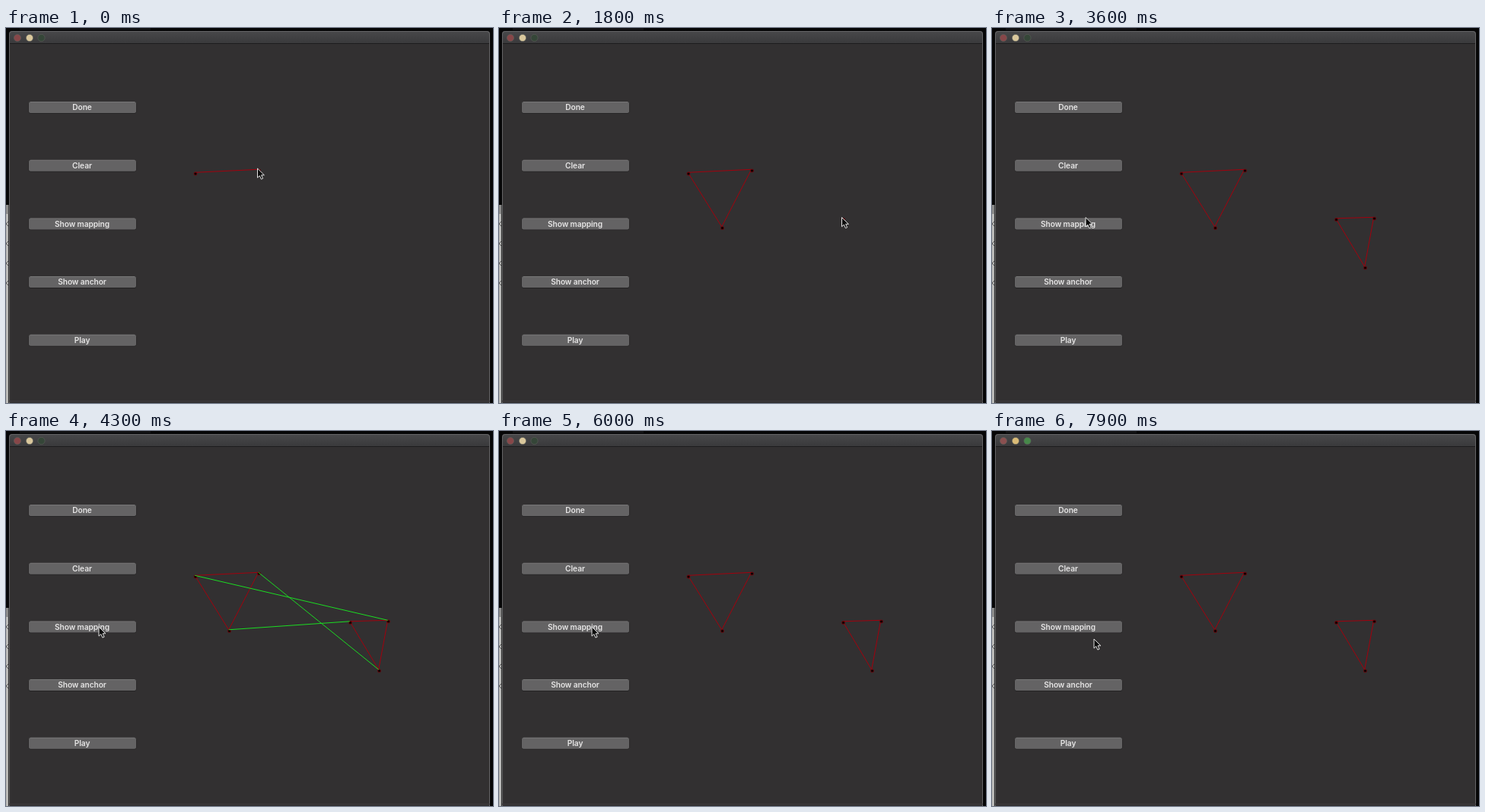
These frames come from a looping animation (640 px wide and 494 px high, 8 s). An HTML page:

```html
<!DOCTYPE html>
<html lang="en">
<head>
<meta charset="utf-8">
<title>Shape mapping</title>
<style>
html, body { margin: 0; width: 100%; height: 100%; overflow: hidden; background: #060607; }
svg { display: block; width: 640px; height: 494px; }
text { font: 600 10.2px Inter, "Liberation Sans", sans-serif; letter-spacing: -.08px; text-anchor: middle; fill: #e6e5e5; }
</style>
</head>
<body>
<svg viewBox="0 0 640 494">
  <defs>
    <linearGradient id="bar" x2="0" y2="1">
      <stop stop-color="#48484a"/><stop offset="1" stop-color="#39393b"/>
    </linearGradient>
  </defs>
  <rect width="640" height="494" fill="#060607"/>
  <path d="M18 0H190V3H18Z" fill="#111113"/>
  <path d="M0 233H3.2V494H0Z" fill="#b9b9b7"/>
  <path d="M0 233H3.2V245H0Z" fill="#8b8b8a"/>
  <g id="desktop" fill="none" stroke="#555"></g>
  <path d="M4 494V8Q4 4 8 4H632Q636 4 636 8V494Z" fill="#323031"/>
  <path d="M4 21V8Q4 4 8 4H632Q636 4 636 8V21Z" fill="url(#bar)"/>
  <path d="M4 20.5H636" stroke="#1d1c1d"/>
  <path d="M4.5 494V8Q4.5 4.5 8 4.5H632Q635.5 4.5 635.5 8V494" fill="none" stroke="#656567"/>
  <path d="M4 491.5H636" stroke="#3f3a3d"/>
  <g id="lights"></g>
  <g id="buttons"></g>
  <g id="edges" stroke="#a3000d"></g>
  <g id="dots" fill="#050000" stroke="#7d000a"></g>
  <g id="mapping" stroke="#1bdc22"></g>
  <path id="cursor" d="M0 0V12.2L2.8 9.6L4.9 14.2L7.1 13.2L5.1 8.8H8.9Z" fill="#0b0b0b" stroke="#e4e4e4" stroke-linejoin="round"/>
</svg>
<script>
const LOOP = 8000, HOLD = 200, MAX_MOVE = 900;
const byId = id => document.getElementById(id);

function add(parent, tag, attrs, text = '') {
  const el = document.createElementNS('http://www.w3.org/2000/svg', tag);
  for (const key in attrs) el.setAttribute(key, attrs[key]);
  el.textContent = text;
  byId(parent).append(el);
  return el;
}

for (let y = 258; y < 350; y += 26) add('desktop', 'path', { d: `M3 ${y - 3}L0 ${y}L3 ${y + 3}` });

const points = [[249, 192], [332.5, 188], [293.5, 263.5], [452.5, 252.5], [502.5, 251], [490.5, 316]];
const labels = ['Done', 'Clear', 'Show mapping', 'Show anchor', 'Play'];

// Cursor stops; a button acts when it is released
const vertex = (time, i) => ({ time, i, x: points[i][0] - 2, y: points[i][1] - 3, hold: HOLD / 2 });
const press = (time, label, x, y) => ({ time, label, x, y, hold: HOLD });
const done = time => press(time, 'Done', 141, 105);
const toggle = time => press(time, 'Show mapping', 122, 258);
const stops = [
  vertex(0, 0), vertex(0, 1), vertex(600, 2), done(1100),
  vertex(1800, 3), vertex(2050, 4), vertex(2300, 5), done(2800),
  toggle(3700), toggle(5500), { time: 7900, x: 134, y: 274, hold: HOLD }
];
const releases = label => stops.filter(s => s.label === label).map(s => s.time + HOLD);
const drawnAt = points.map((_, i) => stops.find(s => s.i === i).time);
const [showAt, hideAt] = releases('Show mapping');

const lights = [15, 31, 46.5].map(cx =>
  add('lights', 'circle', { cx, cy: 13, r: 4.6, stroke: '#5d615c', 'stroke-width': .6 }));
const dim = ['#874749', '#d9c79c', '#354638'];
const lit = ['#8b5050', '#dabb77', '#47884a'];

const buttons = labels.map((label, i) => {
  const y = 97 + i * 76.7;
  add('buttons', 'rect', { x: 29.5, y: y + .5, width: 142, height: 15.3, rx: 3, fill: '#242324' });
  const face = add('buttons', 'rect', { x: 30, y, width: 141, height: 15, rx: 2.5 });
  add('buttons', 'path', { d: `M32 ${y + .5}H169`, stroke: '#fff', opacity: .12 });
  add('buttons', 'text', { x: 100, y: y + 11.2 }, label);
  return face;
});

const timed = [];
const appear = (el, from, to = LOOP) => timed.push({ el, from, to });
const line = (parent, [x1, y1], [x2, y2]) =>
  add(parent, 'line', { x1: x1 - .8, y1: y1 - 1.7, x2: x2 - .8, y2: y2 - 1.7 });

// Two triangles, each closed by "Done"
points.forEach((p, i) => {
  const first = i - i % 3;
  if (i > first) appear(line('edges', points[i - 1], p), drawnAt[i]);
  if (i === first + 2) appear(line('edges', p, points[first]), releases('Done')[first / 3]);
  appear(add('dots', 'rect', {
    x: p[0] - 1.8, y: p[1] - 1.8, width: 3.6, height: 3.6, rx: 1, 'stroke-width': .8
  }), drawnAt[i]);
});
for (let i = 0; i < 3; i++) line('mapping', points[i], points[3 + (i + 1) % 3]);
appear(byId('mapping'), showAt, hideAt);

function cursorAt(t) {
  const last = stops.filter(s => s.time <= t).pop();
  const next = stops.find(s => s.time > t) || last;
  const from = Math.max(last.time + last.hold, next.time - MAX_MOVE);
  const u = Math.min(1, Math.max(0, (t - from) / (next.time - from)));
  const k = u * u * (3 - 2 * u);
  return [last.x + (next.x - last.x) * k, last.y + (next.y - last.y) * k];
}

function draw(now) {
  const t = Math.floor(now % LOOP / 100) * 100;
  for (const { el, from, to } of timed) {
    el.setAttribute('visibility', t >= from && t < to ? 'visible' : 'hidden');
  }
  buttons.forEach((el, i) => {
    const down = stops.some(s => s.label === labels[i] && t >= s.time && t < s.time + HOLD);
    el.setAttribute('fill', down ? '#2b74e4' : '#646364');
  });
  // The window lights brighten in every third 900 ms span
  const shades = Math.floor((t - 100) / 900) % 3 === 2 ? lit : dim;
  lights.forEach((el, i) => el.setAttribute('fill', shades[i]));
  byId('cursor').setAttribute('transform', `translate(${cursorAt(t)})`);
}

const start = performance.now();
function tick() {
  draw(performance.now() - start);
  requestAnimationFrame(tick);
}
tick();
</script>
</body>
</html>
```
